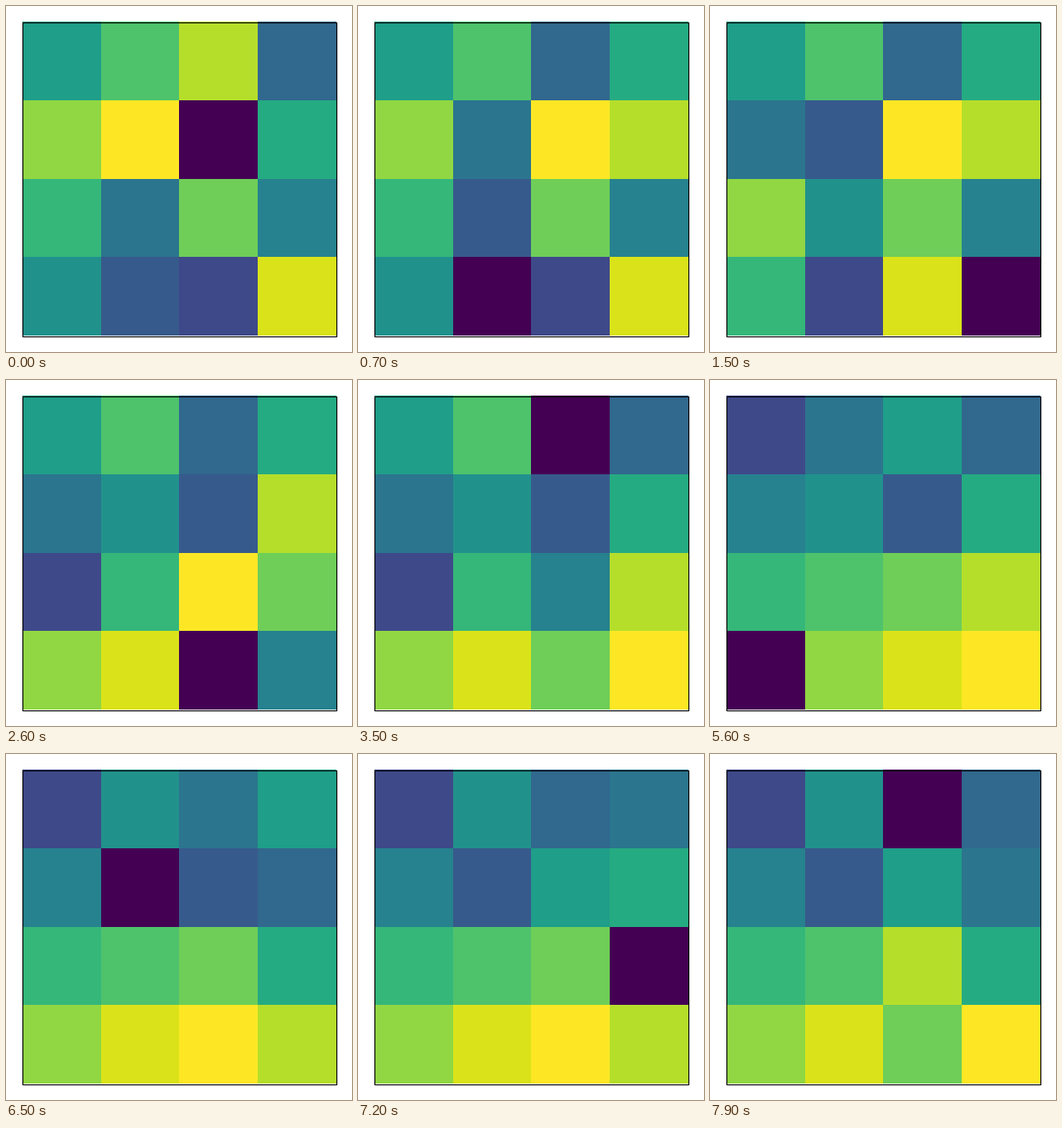
These frames come from a looping animation (400 px wide and 400 px high, 8 s). A matplotlib script:

```python
import numpy as np
import matplotlib.pyplot as plt
from matplotlib.animation import FuncAnimation
from matplotlib.patches import Rectangle

SIZE = 400
BLANK = -3
START = np.array([
    [7, 10, 13, 3],
    [12, 15, BLANK, 8],
    [9, 4, 11, 5],
    [6, 2, 1, 14],
])

# Directions in which the blank travels, one step per tick.
MOVES = (
    "URDLLDDLUURDDRR"
    "ULULDDLURDR"
    "URDLURUULDLULDDRRD"
    "LLURURULLDDD"
    "RRRUUULLD"
    "RRULDRDDLURUUL"
)
STEP = {"U": (-1, 0), "D": (1, 0), "L": (0, -1), "R": (0, 1)}


def play(board, moves):
    """Return every board of the game, the first one included."""
    boards = [board]
    r, c = np.argwhere(board == BLANK)[0]
    for move in moves:
        dr, dc = STEP[move]
        board = board.copy()
        board[r, c] = board[r + dr, c + dc]
        r, c = r + dr, c + dc
        board[r, c] = BLANK
        boards.append(board)
    return boards


boards = play(START, MOVES)

fig = plt.figure(figsize=(4, 4), dpi=SIZE / 4, facecolor="white")
ax = fig.add_axes([0, 0, 1, 1])
ax.set_xlim(0, SIZE)
ax.set_ylim(SIZE, 0)
ax.axis("off")

# The tiles sit one pixel above the border's lower edge.
x_edges = [19, 110, 200, 291, 382]
y_edges = [18, 109, 200, 290, 381]
mesh = ax.pcolormesh(x_edges, y_edges, START, cmap="viridis",
                     vmin=BLANK, vmax=15, antialiased=False)
ax.set_xlim(0, SIZE)
ax.set_ylim(SIZE, 0)
ax.add_patch(Rectangle((19.5, 19.5), 363, 363, fill=False, ec="black",
                       lw=0.8, snap=False, zorder=3))


def update(i):
    mesh.set_array(boards[i])
    return [mesh]


anim = FuncAnimation(fig, update, frames=len(boards), interval=100,
                     repeat=True, repeat_delay=0, blit=False)
plt.show()
```
